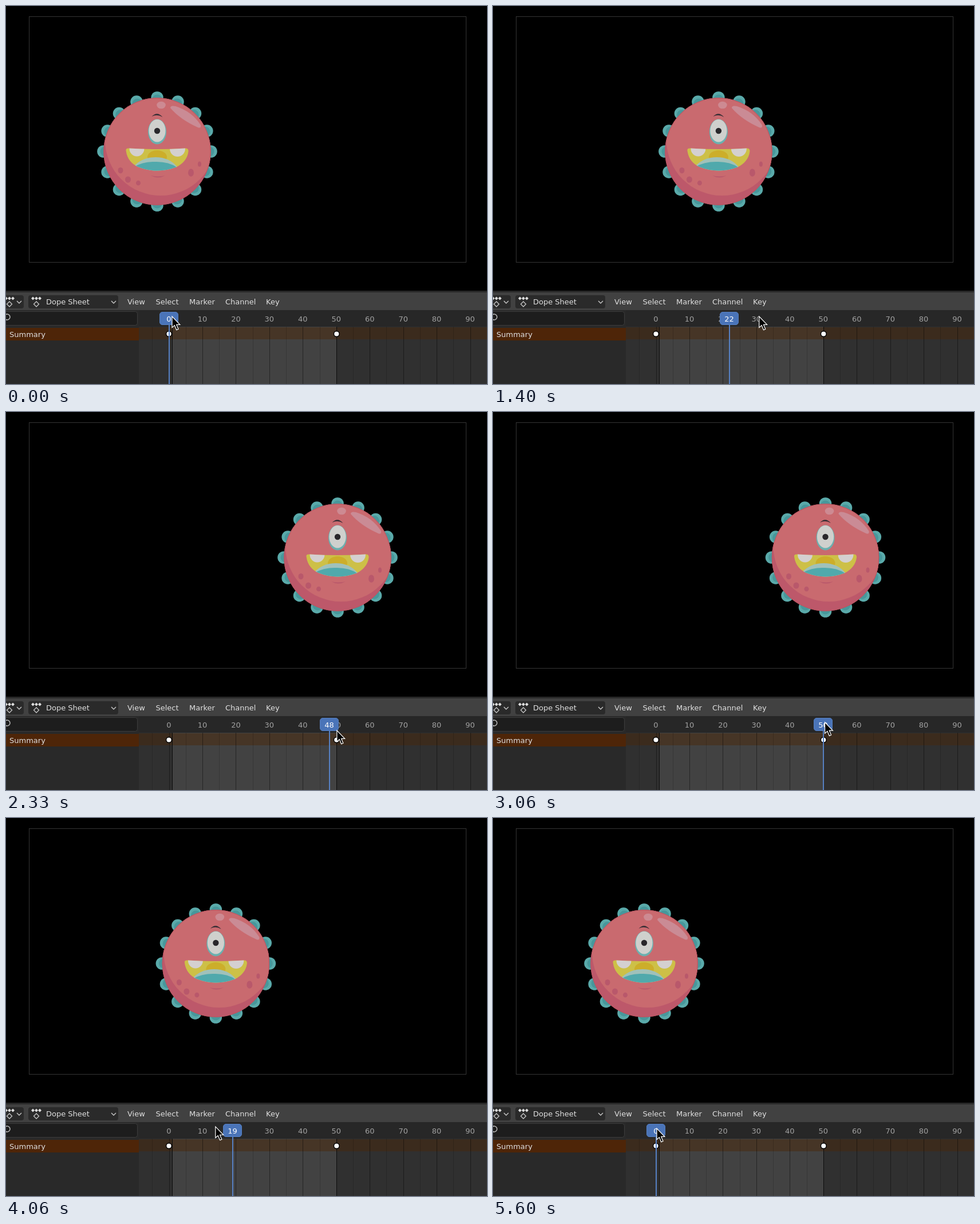
Write an HTML page that moves like this. It is 840 by 660 pixels and loops after 5860 ms.

```html
<!DOCTYPE html>
<html lang="en">
<head>
<meta charset="utf-8">
<title>Dope sheet scrub</title>
<style>
  html, body { margin: 0; width: 100%; height: 100%; overflow: hidden; background: #000; }
  svg { display: block; }
  text { font: 13px "DejaVu Sans", sans-serif; fill: #e0e0e0; }
  .num { text-anchor: middle; fill: #a0a0a0; }
</style>
</head>
<body>
<svg width="840" height="660">
  <defs>
    <clipPath id="bodyClip"><circle cx="264" cy="254" r="93.7"/></clipPath>
    <clipPath id="mouthClip">
      <path id="mouthShape" d="M209.500 252Q209 248 215 248.500Q264 251.500 313 248.500Q319 248 318.500 254C317 267 308 276 298 281Q264 294 231 281C219 276 211 266 209.500 252Z"/>
    </clipPath>
    <g id="icon">
      <path d="M-6 -8.500l3 3-3 3-3-3zM0 -8.500l3 3-3 3-3-3zM6 -8.500l3 3-3 3-3-3z" fill="#ddd"/>
      <path d="M0 0l4.500 4.500-4.500 4.500-4.500-4.500z" fill="none" stroke="#c8c8c8" stroke-width="1.3"/>
    </g>
    <path id="chevron" d="M-4 -2l4 4 4-4" fill="none" stroke="#c8c8c8" stroke-width="1.4"/>
  </defs>

  <rect width="840" height="660"/>
  <rect x="40.5" y="18.5" width="763" height="429" fill="none" stroke="#343434"/>

  <g id="ball">
    <g id="bumps"></g>
    <circle cx="264" cy="254" r="93.7" fill="#bd586a"/>
    <circle cx="270" cy="234" r="97" fill="#c96a6f" clip-path="url(#bodyClip)"/>
    <circle cx="264" cy="254" r="93.2" fill="none" stroke="#b85560"/>
    <ellipse cx="271" cy="173" rx="7.8" ry="6.3" fill="#cd8a92"/>
    <path d="M287 178Q287 173 296 175Q325 184 340 208Q341 214 335 212Q304 198 287 178Z" fill="#ca8b95"/>
    <g fill="#b9586b">
      <ellipse cx="200" cy="287" rx="4.5" ry="5.3"/>
      <ellipse cx="213" cy="303" rx="5" ry="5.5"/>
      <ellipse cx="231" cy="309" rx="4" ry="4.3"/>
      <ellipse cx="323" cy="291" rx="5" ry="6.8"/>
      <ellipse cx="338" cy="276" rx="3" ry="4.6"/>
      <path d="M253 296Q265 299 278 296Q265 303 253 296Z"/>
    </g>
    <path d="M254.500 193Q264 183 273.500 194Q264 188 254.500 193Z" fill="#352d34"/>
    <ellipse cx="264" cy="219.5" rx="16" ry="22" fill="#6bb0af"/>
    <ellipse cx="264" cy="217.7" rx="14.6" ry="19.7" fill="#cfd0cd"/>
    <circle cx="264" cy="218" r="5.2" fill="#29272b"/>
    <use href="#mouthShape" fill="#cdc047"/>
    <g clip-path="url(#mouthClip)">
      <ellipse cx="264" cy="264" rx="17" ry="12" fill="#ccae2a"/>
      <path d="M223 280Q238 264 261 264Q285 264 299 281L264 300Z" fill="#a0c1ba"/>
      <path d="M223 281Q240 271.500 261 272Q284 271.500 299 282L264 300Z" fill="#50a9ac"/>
      <ellipse cx="228.5" cy="249" rx="13" ry="13.5" fill="#d4d0d0"/>
      <ellipse cx="299.5" cy="249" rx="13.5" ry="14" fill="#d4d0d0"/>
    </g>
  </g>

  <rect y="497" width="840" height="34" fill="#414141"/>
  <rect y="497" width="840" height="3" fill="#282828"/>
  <rect x="-10" y="505" width="41" height="23" rx="4" fill="#2a2a2a"/>
  <rect x="39" y="505" width="157" height="23" rx="4" fill="#2a2a2a"/>
  <use href="#icon" x="6" y="516"/>
  <use href="#icon" x="53" y="516"/>
  <use href="#chevron" x="23" y="517"/>
  <use href="#chevron" x="188" y="517"/>
  <text x="70" y="521">Dope Sheet</text>
  <text x="212" y="521">View</text>
  <text x="261.5" y="521">Select</text>
  <text x="320" y="521">Marker</text>
  <text x="383" y="521">Channel</text>
  <text x="454" y="521">Key</text>

  <rect y="531" width="232" height="129" fill="#292929"/>
  <rect x="-9.5" y="533.5" width="239" height="24" rx="4" fill="#1d1d1d" stroke="#3c3c3c"/>
  <circle cx="2" cy="543" r="5" fill="none" stroke="#bbb" stroke-width="1.5"/>
  <rect y="562" width="232" height="22" fill="#4e2508"/>
  <text x="6" y="578">Summary</text>

  <rect x="232" y="531" width="608" height="29" fill="#272727"/>
  <rect x="232" y="560" width="608" height="100" fill="#303030"/>
  <rect x="290" y="560" width="287" height="100" fill="#424242"/>
  <rect x="232" y="561" width="608" height="21" fill="#3b2b1d"/>
  <rect x="290" y="561" width="287" height="21" fill="#463526"/>
  <g id="grid"></g>
  <path d="M290.500 560V660M577.500 560V660" stroke="#0c0c0c"/>
  <g fill="#fff" stroke="#000" stroke-width="1.4">
    <circle cx="284.5" cy="572.5" r="4.8"/>
    <circle cx="577.3" cy="572.5" r="4.8"/>
  </g>

  <g id="head">
    <rect x="-1" y="556" width="2" height="104" fill="#5680c2"/>
    <rect x="-16.5" y="534.5" width="32" height="22" rx="4.5" fill="#4a74b8" stroke="#5680c2"/>
    <text id="count" x="-.5" y="551" text-anchor="middle" style="fill:#fff"></text>
  </g>
  <path id="cursor" d="M0 0V19.500L4.400 15.500L7.800 23.600L11 22.200L7.700 14.300H13.800Z" fill="#000" stroke="#fff" stroke-width="1.2"/>
</svg>
<script>
const LOOP = 5860, LEAD = 200;
const $ = id => document.getElementById(id);
const frameX = f => 284.5 + 5.845 * f;

let bumps = '';
for (let i = 0; i < 16; i++) {
  const a = i * Math.PI / 8;
  const dot = (d, r, fill) =>
    `<circle cx="${264 + d * Math.cos(a)}" cy="${254 + d * Math.sin(a)}" r="${r}" fill="${fill}"/>`;
  bumps += dot(94, 10.8, '#5aaaaa') + dot(91, 8.5, '#47979b');
}
$('bumps').innerHTML = bumps;

let grid = '';
for (let f = -5; f <= 90; f += 5) {
  const x = Math.round(frameX(f)), major = f % 10 === 0;
  grid += `<rect x="${x}" y="560" width="1" height="100" opacity="${major ? .42 : .16}"/>`;
  if (major && f >= 0) grid += `<text class="num" x="${frameX(f)}" y="551">${f}</text>`;
}
$('grid').innerHTML = grid;

// The scrub: [time, timeline frame]
const keys = [[400, 0], [930, 2], [1400, 22], [2130, 46.5], [2730, 50], [3240, 50],
  [3600, 36], [4060, 19], [4530, 8], [4860, 5], [5400, 0]];
const last = keys.length - 1;
const slope = i => (keys[i + 1][1] - keys[i][1]) / (keys[i + 1][0] - keys[i][0]);

// Tangent that never overshoots: harmonic mean of the neighbouring slopes.
function tangent(i) {
  if (i === 0 || i === last) return 0;
  const a = slope(i - 1), b = slope(i);
  return a * b > 0 ? 2 * a * b / (a + b) : 0;
}

function scrub(t) {
  if (t <= keys[0][0]) return keys[0][1];
  if (t >= keys[last][0]) return keys[last][1];
  const i = keys.findIndex(k => k[0] > t) - 1;
  const [t0, f0] = keys[i], [t1, f1] = keys[i + 1];
  const d = t1 - t0, u = (t - t0) / d;
  return f0 + (f1 - f0) * u * u * (3 - 2 * u)
    + d * u * (1 - u) * (tangent(i) * (1 - u) - tangent(i + 1) * u);
}

// Hold each picture for 60 or 70 ms, three per 200 ms.
function snap(t) {
  if (t < 400) return 0;
  if (t >= 5600) return 5600;
  const r = t % 200;
  return t - r + (r < 60 ? 0 : r < 130 ? 60 : 130);
}

const bell = (t, mid, width) => Math.exp(-(((t - mid) / width) ** 2));
const move = (id, x, y = 0) => $(id).setAttribute('transform', `translate(${x} ${y})`);

function draw(time) {
  const t = snap(time % LOOP);
  const f = Math.round(scrub(t));
  const u = f / 50;
  move('ball', 316.5 * u * u * (3 - 2 * u));
  move('head', Math.round(frameX(f)));
  $('count').textContent = f;
  // The playhead lags behind the hand, which drifts a little.
  move('cursor', frameX(scrub(t + LEAD)) + 5.5 - 4 * t / 5600,
    542 + 14 * bell(t, 2330, 350) - 4 * bell(t, 3800, 500));
}

const start = performance.now();
function tick() {
  draw(performance.now() - start);
  requestAnimationFrame(tick);
}
tick();
</script>
</body>
</html>
```
